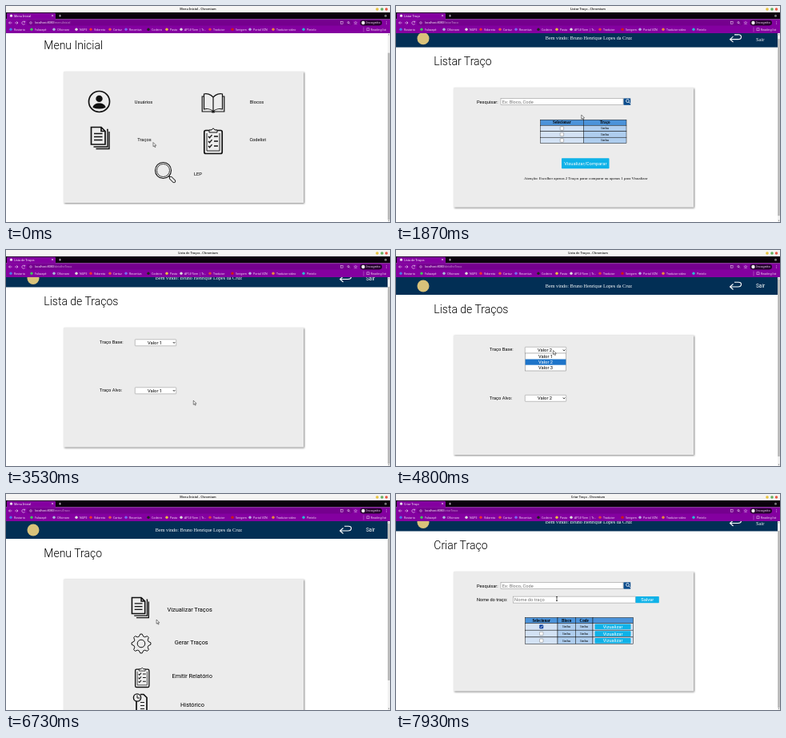
Recreate the animation shown at these times as an HTML page. Size 480 by 270 pixels, loop 8 s.

```html
<!DOCTYPE html>
<html lang="pt-BR">
<head>
<meta charset="utf-8">
<title>Menu</title>
<style>
html, body { margin: 0; width: 100%; height: 100%; overflow: hidden; background: #fff; }
svg { display: block; }
text { font-family: Roboto, sans-serif; white-space: pre; }
.ui { font-family: "Noto Sans", sans-serif; }
.serif { font-family: "Liberation Serif", serif; }
.mid { text-anchor: middle; }
.line { fill: none; stroke: #111; }
.card { filter: drop-shadow(1px 1px .8px #0007); }
</style>
</head>
<body>
<svg id="stage" width="100%" height="100%" viewBox="0 0 480 270">
  <g id="browser"></g>
  <svg y="34" width="477" height="236"><g id="page"></g></svg>
  <g id="bar"></g>
  <g id="cursor"></g>
</svg>
<script>
const LOOP = 8000;
const $ = id => document.getElementById(id);

// Markup helpers
const rect = (x, y, w, h, fill, more = '') =>
  `<rect x="${x}" y="${y}" width="${w}" height="${h}" fill="${fill}" ${more}/>`;
const disc = (x, y, r, fill) => `<circle cx="${x}" cy="${y}" r="${r}" fill="${fill}"/>`;
const text = (x, y, s, size, cls = '', more = '') =>
  `<text x="${x}" y="${y}" font-size="${size}" class="${cls}" ${more}>${s}</text>`;
const line = (d, w = 1, more = '') => `<path d="${d}" class="line" stroke-width="${w}" ${more}/>`;
const put = (x, y, k, s) => `<g transform="translate(${x} ${y}) scale(${k})">${s}</g>`;
const WHITE = 'fill="#fff"';

// Icons
const lens = (x, y, r, color, w) =>
  `<g fill="none" stroke="${color}" stroke-width="${w}"><circle cx="${x}" cy="${y}" r="${r}"/>` +
  `<path d="M${x + r * .7} ${y + r * .7}l${r} ${r}"/></g>`;
const user = `<circle r="13" class="line" stroke-width="1.7"/>` + disc(0, -3.6, 4.2, '#111') +
  '<path d="M-8 7.5C-8 0 8 0 8 7.5Q4 9 0 9T-8 7.500z" fill="#111"/>';
const book = line('M14.500 5C11 1 6 0 3 1V20C7 19 12 20 14.500 23C17 20 22 19 26 20V1C23 0 18 1 14.500 5V23', 1.2) +
  line('M3 4H.7V23H12.500Q14.500 25 16.500 23H28.300V4H26', 1.2);
const docs = line('M1 1H13.500L18.500 6V22.500H1zM13.500 1V6H18.500', 1.7) +
  line('M20.500 4H21.500V25.500H4M23.500 6.500V28H7', 1.4) +
  line('M4.500 9H15M4.500 13H15M4.500 17H15', 1.3);
const clip = rect(.8, 3.5, 22.4, 29, 'none', 'rx="2" class="line" stroke-width="1.7"') +
  line('M4 7V29H20V7', .9) + '<path d="M7 6V3H10Q12-1 14 3H17V6z" fill="#ececec" stroke="#111"/>' +
  [11, 17, 23].map(y => line(`M6 ${y}l1.500 1.700 3-3.500M13 ${y}h5`, 1.3)).join('');
const glass = '<circle cx="11" cy="11" r="10" class="line" stroke-width="1.1"/>' +
  '<circle cx="11" cy="11" r="8" class="line" stroke-width=".8"/>' +
  line('M18 18l2 2', 1.6) + line('M20.500 20.500l4 4', 4.4, 'stroke-linecap="round"') +
  '<path d="M20.500 20.500l4 4" stroke="#ececec" stroke-width="2.600" stroke-linecap="round"/>';
const gear = (() => {
  let d = '';
  for (let i = 0; i < 32; i++) {
    const a = (i - .5) * Math.PI / 16, r = i % 4 < 2 ? 12 : 9.3;
    d += `${i ? 'L' : 'M'}${(r * Math.cos(a)).toFixed(1)} ${(r * Math.sin(a)).toFixed(1)}`;
  }
  return line(d + 'z', 1, 'stroke-linejoin="round"') + '<circle r="4.800" class="line"/>';
})();
const history = line('M4 8V23H17V5L13 1H9', 1.7) + line('M9 11H14M9 15H14M9 19H14', 1.2) +
  '<circle cx="5" cy="5" r="4.600" fill="#ececec" stroke="#111" stroke-width="1.400"/>' + line('M5 2V5.500H8', 1);

// Page parts, laid out as seen with no scrolling
const header = sairFont =>
  rect(0, 34, 477, 22, '#022f55') + disc(34, 45, 7.5, '#d9c27a') +
  text(241, 46.8, 'Bem vindo: Bruno Henrique Lopes da Cruz', 6.2, 'serif mid', WHITE) +
  '<path d="M421.500 42.500l-4 3.500 4 3.500M418 46h9.500q4 0 4-3t-4-2.800h-4.500" fill="none" stroke="#fff" stroke-width="1.100"/>' +
  text(450, sairFont ? 48.8 : 47.3, 'Sair', 6.5, sairFont, WHITE);
const frame = (title, h, sairFont = '') =>
  header(sairFont) + text(47.3, 78.5, title, 14, '', 'font-weight="300"') +
  rect(72, 106.5, 300, h, '#ececec', 'class="card"');
const field = (x, y, w, hint) =>
  rect(x, y, w, 8, '#fff', 'stroke="#888" stroke-width=".5"') + text(x + 1.8, y + 6, hint, 5.7, '', 'fill="#757575"');
const button = (x, y, w, h, label, size = 5.8) =>
  rect(x, y, w, h, '#0fb2e8', 'rx=".8"') + text(x + w / 2, y + h / 2 + size * .35, label, size, 'mid', WHITE);
const search = text(101, 126, 'Pesquisar:', 5.7) + field(131, 120, 153, 'Ex: Bloco, Code') +
  rect(284.5, 119.8, 8.7, 8.4, '#0b4c8c') + lens(289.5, 123, 1.9, '#fff', .8);
const check = (x, y, on) =>
  rect(x - 2.2, y - 2.2, 4.4, 4.4, on ? '#0b3f9c' : '#fff', `rx=".6" stroke="${on ? '#0b3f9c' : '#777'}" stroke-width=".5"`) +
  (on ? `<path d="M${x - 1.3} ${y}l1 1.100 1.800-2.200" fill="none" stroke="#fff" stroke-width=".800"/>` : '');

function table(xs, heads, y, headH, rowH, checked, lastCell) {
  let s = '';
  const n = heads.length;
  for (let r = 0; r < 4; r++) {
    const h = r ? rowH : headH, top = r ? y + headH + (r - 1) * rowH : y;
    heads.forEach((head, c) => {
      const x = xs[c], w = xs[c + 1] - x, mx = x + w / 2, my = top + h / 2;
      const own = lastCell && c === n - 1;
      s += rect(x, top, w, h, !r ? '#4b93da' : c && !own ? '#aecdee' : '#d3e2f4', 'stroke="#111" stroke-width=".5"');
      if (!r) s += text(mx, my + 1.6, head, 5.1, 'serif mid', 'font-weight="bold"');
      else if (!c) s += check(mx, my, checked[r - 1]);
      else s += own ? lastCell(x, top) : text(mx, my + 1.5, 'linha', 4.9, 'serif mid');
    });
  }
  return s;
}

const select = (y, value) =>
  rect(161.3, y, 51.4, 8, '#fff', 'stroke="#888" stroke-width=".5" rx=".5"') +
  text(186, y + 6.1, 'Valor ' + value, 5.8, 'mid') + line(`M208.800 ${y + 3.2}l1.300 1.500 1.300-1.500`, .8);
function options(y, value, my) {
  const over = Math.floor((my - y - .5) / 7.2);
  const hot = over >= 0 && over < 3 ? over : value - 1;
  return rect(161.3, y, 51.4, 22, '#fff', 'stroke="#777" stroke-width=".5"') +
    rect(161.6, y + .3 + hot * 7.2, 50.8, 7.2, '#1d74c9') +
    [0, 1, 2].map(i => text(187, y + 5.6 + i * 7.2, 'Valor ' + (i + 1), 5.8, 'mid', i === hot ? WHITE : '')).join('');
}

// Each page: window title, address, scrollable range, markup
const pages = {
  start: {
    title: 'Menu Inicial', path: 'menuInicial', range: 24.5,
    draw: () => frame('Menu Inicial', 164) +
      put(116.5, 144, 1, user) + put(244.5, 133.5, 1, book) + put(105.5, 175, 1, docs) +
      put(247, 176.5, 1, clip) + put(185.5, 219, 1, glass) +
      [[172, 146, 'Usuários'], [313.5, 146, 'Blocos'], [173, 193.8, 'Traços'], [314.8, 193.8, 'Codelist'], [240, 236.3, 'LEP']]
        .map(([x, y, s]) => text(x, y, s, 5.7, 'mid')).join('')
  },
  menu: {
    title: 'Menu Inicial', path: 'menuTraco', range: 41,
    draw: () => frame('Menu Traço', 180.5) +
      put(156.5, 128.5, .93, docs) + put(169, 187, 1, gear) + put(161, 216.5, .77, clip) + put(159, 249.5, 1, history) +
      [[229.7, 147.3, 'Vizualizar Traços'], [231.7, 187.6, 'Gerar Traços'], [232.7, 229.6, 'Emitir Relatório'], [233, 265.6, 'Histórico']]
        .map(([x, y, s]) => text(x, y, s, 7.4, 'mid')).join('')
  },
  list: {
    title: 'Listar Traço', path: 'listarTraco', range: 9.5,
    draw: t => frame('Listar Traço', 149.5, 'serif') + search +
      table([180.5, 234.3, 288], ['Selecionar', 'Traço'], 146.6, 7, 7.5, [t > 2990, t > 2740, false]) +
      button(207, 194.5, 59.5, 13.2, 'Visualizar/Comparar') +
      text(237.2, 221.3, 'Atenção: Escolher apenas 2 Traços parar comparar ou apenas 1 para Visualizar', 4.9, 'serif mid')
  },
  detail: {
    title: 'Lista de Traços', path: 'detalheTraco', range: 9.5,
    draw: (t, my) => {
      const base = t < 4120 ? 1 : 2, target = t < 4470 ? 1 : 2;
      return frame('Lista de Traços', 149.5) +
        text(117, 126.4, 'Traço Base:', 5.7) + select(121.3, base) +
        text(117, 186.5, 'Traço Alvo:', 5.7) + select(181.3, target) +
        (t > 3930 && t < 4120 || t > 4670 && t < 5130 ? options(129, base, my) : '') +
        (t > 4270 && t < 4470 ? options(189, target, my) : '');
    }
  },
  create: {
    title: 'Criar Traço', path: 'criarTraco', range: 9.5,
    draw: t => frame('Criar Traço', 149.5, 'serif') + search +
      text(101, 143.6, 'Nome do traço:', 5.6) + field(146.3, 137.6, 153, 'Nome do traço') +
      button(299.5, 137.5, 29.3, 8.2, 'Salvar') +
      table([161.5, 202, 224.3, 246, 296.5], ['Selecionar', 'Bloco', 'Code', ''], 164, 7, 8.7, [t > 7800, false, false],
        (x, y) => button(x + 2.5, y + 1, 45, 6.8, 'Vizualizar', 5.7))
  }
};

// Timeline
const visits = [[0, 'start'], [470, 'menu'], [1470, 'list'], [3430, 'detail'], [5700, 'list'], [6270, 'menu'], [7000, 'create']];
const scrolls = [[0, 24.5], [800, 24.5], [950, 0], [1800, 0], [1950, 9.5], [3700, 9.5], [3820, 0], [5699, 0],
  [5700, 9.5], [6269, 9.5], [6270, 0], [7400, 0], [7530, 9.5], [8000, 9.5]];
const moves = [[0, 184, 170.5], [70, 184, 170.5], [400, 176, 167], [800, 182, 163], [1270, 217, 144], [1500, 218, 145],
  [1900, 232, 136], [2450, 207, 153], [2670, 206, 155], [2760, 206, 155], [2960, 206, 147.5], [3020, 206, 147.5],
  [3340, 236, 191], [3480, 236, 191], [3880, 197, 126], [3960, 197, 126], [4100, 188, 140], [4130, 188, 140],
  [4250, 196, 185], [4300, 196, 186], [4440, 189, 200], [4480, 189, 200], [4650, 196.5, 125.5], [4850, 196.5, 125.5],
  [5080, 190, 140], [5140, 190, 140], [5600, 6, 20], [6330, 6, 20], [6870, 224, 184], [7030, 224, 184],
  [7200, 215, 177.5], [7450, 205, 175], [7740, 181, 165.5], [7810, 181, 165.5], [7930, 201, 131], [8000, 201, 131]];

const stepAt = (keys, t) => keys.filter(k => k[0] <= t).pop()[1];
function tween(keys, t, i = 1) {
  const n = Math.max(1, keys.findIndex(k => k[0] > t)), a = keys[n - 1], b = keys[n];
  const u = (t - a[0]) / (b[0] - a[0]);
  return a[i] + (b[i] - a[i]) * u * u * (3 - 2 * u);
}

const bookmarks = [[10, 'Rostaria', '#4a7de8'], [36, 'Falazapé', '#3fc75a'], [64, 'Oficinaro', '#a9b8d8'], [92, 'NUPE', '#ddd'],
  [110, 'Vidoreta', '#f03030'], [134, 'Cartuz', '#e85a4a'], [154, 'Recortiva', '#7a6af0'], [182, 'Codeiro', '#222'],
  [205, 'Pasta', '#e8c040'], [223, 'API 4°Sem | Tr...', '#ddd'], [259, 'Tradutor', '#e04040'], [287, 'Serigem', '#d01818'],
  [309, 'Portal VZN', '#b9a8e0'], [338, 'Tradutor video', '#e88a3a'], [376, 'Pintelo', '#28bcd0']];

function browser(p) {
  const lite = 'fill="#f3e6f6"';
  const thin = (d, w = .6) => `<path d="${d}" fill="none" stroke="#f3e6f6" stroke-width="${w}"/>`;
  return rect(0, 0, 480, 8, '#f6f5f4') +
    text(240, 5.3, p.title + ' - Chromium', 3.7, 'ui mid', 'font-weight="bold" fill="#333"') +
    disc(464, 4, 1.8, '#e8c23c') + disc(470, 4, 1.8, '#5fae5a') + disc(475.5, 4, 1.8, '#e85a48') +
    rect(0, 8, 480, 8.5, '#0b000d') + rect(1, 8.7, 61, 8, '#8400a0', 'rx="1"') + disc(6.5, 12.2, 1.6, '#ece0f0') +
    text(10, 13.7, p.title, 3.7, 'ui', WHITE) +
    thin('M57 11l2.200 2.200M59.200 11L57 13.200M66 12.200h3M67.500 10.700v3') + disc(474.5, 12.2, 1.5, '#777') +
    rect(0, 16.5, 480, 17.5, '#8400a0') + rect(26, 17.6, 408, 6.8, '#75008e', 'rx="3.4"') +
    thin('M7.500 21h-4l1.700-1.700M3.500 21l1.700 1.700M11 21h4l-1.700-1.700M15 21l-1.700 1.700M23.500 20a2 2 0 1 0 .2 2M23.700 18.700v1.500h-1.500') +
    `<circle cx="31" cy="21" r="1.300" fill="none" stroke="#f3e6f6" stroke-width=".5"/>` +
    text(36, 22.4, `localhost:8080<tspan fill="#c79ad0">/${p.path}</tspan>`, 3.5, 'ui', WHITE) +
    rect(418.5, 19.6, 2.6, 2.6, 'none', 'stroke="#f3e6f6" stroke-width=".5"') + lens(428, 20.6, 1.1, '#f3e6f6', .6) +
    thin('M437 19.200l.6 1.200 1.300.1-1 1 .3 1.300-1.200-.7-1.200.7.3-1.300-1-1 1.300-.1z', .4) +
    rect(442.5, 17.8, 27.5, 6.6, '#26002e', 'rx="3.3"') + disc(446.5, 21, 2.2, '#eee') +
    text(450.3, 22.4, 'Incognito', 3.9, 'ui', lite) +
    [19.3, 21, 22.7].map(y => disc(475.5, y, .4, '#fff')).join('') +
    bookmarks.map(([x, s, c]) => disc(x - 4, 29.3, 1.7, c) + text(x, 30.8, s, 3.55, 'ui', lite)).join('') +
    thin('M447 26.500v6', .3) + rect(451, 27.8, 3, 3, 'none', 'stroke="#f3e6f6" stroke-width=".5"') +
    text(456, 30.8, 'Reading list', 3.55, 'ui', lite);
}

function scrollbar(range, y) {
  const k = 230 / (236 + range);
  return rect(477, 34, 3, 236, '#f1f1f1') + rect(477.3, 37 + y * k, 2.4, 236 * k, '#b4b4b4') +
    '<path d="M477.700 36.300l.8-1.200.8 1.200zM477.700 267.800l.8 1.200.8-1.200z" fill="#666"/>';
}

const arrow = '<path d="M0 0v5.200l1.200-1.100.9 2 .9-.4-.9-1.900h1.700z" fill="#fff" stroke="#111" stroke-width=".5"/>';
const beam = line('M-1-2.500h2M0-2.500v5M-1 2.500h2', .7);

const shown = {};
function show(id, html) {
  if (shown[id] !== html) $(id).innerHTML = shown[id] = html;
}

function render(now) {
  const t = now % LOOP, p = pages[stepAt(visits, t)];
  const x = tween(moves, t), y = tween(moves, t, 2), scroll = tween(scrolls, t);
  show('browser', browser(p));
  show('page', p.draw(t, y));
  $('page').setAttribute('transform', `translate(0 ${-34 - scroll})`);
  show('bar', scrollbar(p.range, scroll));
  show('cursor', t > 7880 || t > 1200 && t < 1330 ? beam : arrow);
  $('cursor').setAttribute('transform', `translate(${x} ${y})`);
  requestAnimationFrame(render);
}
requestAnimationFrame(render);
</script>
</body>
</html>
```
